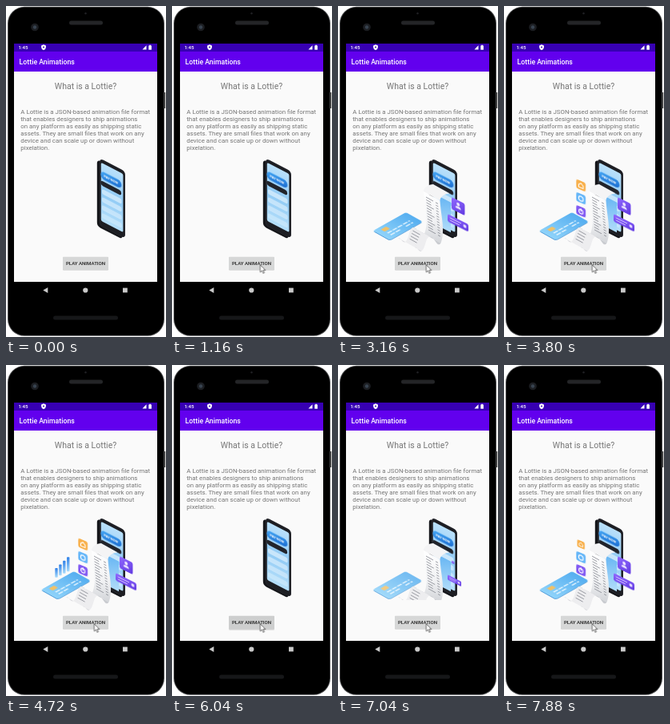
Write an HTML page that moves like this. It is 200 px wide and 414 px high and loops after 8 s.

```html
<!DOCTYPE html>
<html lang="en">
<head>
<meta charset="utf-8">
<title>Lottie Animations</title>
<style>
html, body { margin: 0; width: 100%; height: 100%; overflow: hidden; background: #fff; }
svg { display: block; width: 100%; height: 100%; font-family: Roboto, sans-serif; }
.part { transform-box: fill-box; transform-origin: 50% 50%; }
.bar { transform-origin: 50% 100%; }
.badge { transform-origin: 0 30%; }
</style>
</head>
<body>
<svg viewBox="0 0 200 414">
  <defs>
    <linearGradient id="screen" x2="0" y2="1">
      <stop stop-color="#b9e0fb"/><stop offset=".5" stop-color="#91cbf5"/><stop offset="1" stop-color="#b5dffa"/>
    </linearGradient>
    <linearGradient id="blue" x2="1" y2="1">
      <stop stop-color="#49a9f4"/><stop offset="1" stop-color="#1769cf"/>
    </linearGradient>
    <linearGradient id="barFill" x2="0" y2="1">
      <stop stop-color="#2f80e8"/><stop offset="1" stop-color="#a9dcfb"/>
    </linearGradient>
    <linearGradient id="cardFill">
      <stop stop-color="#8fd3fa"/><stop offset="1" stop-color="#55aef0"/>
    </linearGradient>
    <linearGradient id="shade" x2="0" y2="1">
      <stop stop-color="#66b5f3"/><stop offset="1" stop-color="#b3defa"/>
    </linearGradient>
    <linearGradient id="violet" x2="1" y2="1">
      <stop stop-color="#9169ff"/><stop offset="1" stop-color="#6039e0"/>
    </linearGradient>
    <linearGradient id="paper" x2="0" y2="1">
      <stop stop-color="#fff"/><stop offset=".6" stop-color="#f0f1f3"/><stop offset="1" stop-color="#d2d4d8"/>
    </linearGradient>
  </defs>

  <!-- handset -->
  <path d="M197 108h2.2v20H197z" fill="#333"/>
  <rect x="2" y=".8" width="196" height="412" rx="21" fill="#4a4b4d"/>
  <rect x="3" y="1.8" width="194" height="410" rx="20" fill="#000"/>
  <circle cx="99.5" cy="9.3" r="1.2" fill="#202124"/>
  <rect x="79" y="18.5" width="42" height="5" rx="2.5" fill="#242527"/>
  <rect x="59" y="387.5" width="81" height="5" rx="2.5" fill="#161719"/>
  <circle cx="36" cy="26.5" r="4.8" fill="#1c1e22"/>
  <circle cx="36" cy="26.5" r="2.2" fill="#384350"/>

  <!-- app -->
  <rect x="10" y="47" width="179" height="298" fill="#fafafa"/>
  <rect x="10" y="47" width="179" height="35" fill="#6200ee"/>
  <rect x="10" y="47" width="179" height="10" fill="#3700b3"/>
  <g fill="#fff">
    <text x="15.5" y="54.2" font-size="6.1" font-weight="500">1:45</text>
    <path d="M47 48.3l2.9 1.1v2.1q0 2.6-2.9 3.8q-2.9-1.2-2.9-3.8v-2.1z"/>
    <circle cx="47" cy="51.6" r="1" fill="#3700b3"/>
    <path d="M170.5 54.5h5v-5.2zM178.3 49.5h1v-.7h1.6v.7h1v5.2h-3.6z"/>
    <text x="16.6" y="73.1" font-size="8.75" font-weight="500">Lottie Animations</text>
  </g>
  <g fill="#757575">
    <text x="99.5" y="104" font-size="10.5" text-anchor="middle">What is a Lottie?</text>
    <g id="copy" font-size="7.88"></g>
  </g>
  <g fill="#c9c9c9">
    <path d="M46.3 355.5l6-3.6v7.2z"/><circle cx="99.3" cy="355.5" r="3.1"/>
    <rect x="146" y="352.6" width="5.8" height="5.8"/>
  </g>

  <!-- button -->
  <rect id="lift" x="71" y="315.5" width="57" height="16.6" rx="1.5" fill="#777" opacity="0"/>
  <rect x="71" y="314.2" width="57" height="16.4" rx="1" fill="#c4c4c4"/>
  <rect x="71" y="313.7" width="57" height="16.2" rx="1" fill="#d6d7d7"/>
  <rect id="ripple" x="71" y="313.7" width="57" height="16.2" rx="1" fill="#8d8d8d" opacity="0"/>
  <text x="99.5" y="324.1" font-size="6.1" font-weight="500" text-anchor="middle" fill="#222">PLAY ANIMATION</text>

  <!-- isometric phone -->
  <rect width="32" height="83.5" rx="4.5" transform="matrix(1 .52 0 1 113.8 191.8)" fill="#15161a"/>
  <g transform="matrix(1 .52 0 1 117 190.2)">
    <rect width="32" height="84" rx="4.5" fill="#303137"/>
    <rect x=".5" y=".6" width="31" height="83" rx="4.2" fill="#1d1e23"/>
    <rect x="1.8" y="4.6" width="27.6" height="73" rx="2" fill="url(#screen)"/>
    <g id="rows" fill="#dff1fd"></g>
    <g id="pay" class="part">
      <rect x="1.4" y="14.8" width="26" height="9.6" rx="4.6" fill="url(#blue)"/>
      <text x="14.2" y="21.1" font-size="4.1" font-weight="700" text-anchor="middle" fill="#fff">PAY NOW</text>
    </g>
    <rect x="1.2" y="27" width="26" height="5.8" rx="2.9" fill="#22242b"/>
  </g>

  <!-- card -->
  <g id="card" opacity="0">
    <g transform="matrix(.87 -.49 .87 .49 44 281)">
      <rect x="-.9" y=".9" width="47" height="24" rx="2.5" fill="#3c91d6"/>
      <rect width="47" height="24" rx="2.5" fill="url(#cardFill)"/>
      <rect x="7" y="4" width="7.5" height="5.5" rx="1" fill="#f0c168"/>
      <path d="M7 13.5h32M7 18h14M29 18h10" stroke="#f2faff" stroke-width="1.6" stroke-dasharray="6 1.5"/>
    </g>
  </g>

  <!-- receipt -->
  <g id="receipt">
    <path d="M126 238l15 7.7v37.5l-15-7.8z" fill="url(#shade)"/>
    <g id="sheets"></g>
    <g id="lines" stroke="#83868e" stroke-width=".8" fill="none"></g>
  </g>

  <!-- badges -->
  <g id="low" class="part badge">
    <g transform="matrix(1 .5 0 1 137 260)">
      <rect width="26" height="9.5" rx="2" fill="url(#violet)"/>
      <path d="M3 3.5h14M3 6.4h12" stroke="#d6c8ff" stroke-width="1"/>
      <circle cx="21.5" cy="4.8" r="2" fill="#e6dcff"/>
    </g>
  </g>
  <g id="high" class="part badge">
    <g transform="matrix(1 .5 0 1 142 239)">
      <rect width="16.5" height="15" rx="2" fill="url(#violet)"/>
      <circle cx="8.2" cy="5" r="2" fill="#efe9ff"/>
      <path d="M4.8 10.4q0-3 3.4-3t3.4 3z" fill="#efe9ff"/>
    </g>
  </g>

  <g id="icons"></g>
  <g id="bars" fill="url(#barFill)"></g>

  <path id="cursor" d="M0 0v9.2l2.2-2l1.5 3.3l1.5-.7l-1.5-3.2h2.9z" fill="#fff" stroke="#000" stroke-width=".55" opacity="0"/>
</svg>
<script>
const LOOP = 8000, RESET = 5160, REPLAY = 4160;
const $ = id => document.getElementById(id);
const fill = (id, items, draw) => { $(id).innerHTML = items.map(draw).join(''); };

fill('copy', [
  'A Lottie is a JSON-based animation file format',
  'that enables designers to ship animations',
  'on any platform as easily as shipping static',
  'assets. They are small files that work on any',
  'device and can scale up or down without',
  'pixelation.'
], (line, i) => `<text x="18.3" y="${134.8 + i * 9.12}">${line}</text>`);

fill('rows', [0, 1, 2, 3], i =>
  `<rect x="3" y="${37 + i * 10}" width="24.5" height="6.2" rx="2" opacity="${.7 - i * .08}"/>`);

// Each sheet sweeps one cubic edge of the paper across its width.
fill('sheets', [
  ['#f4f4f5', 119, 223, 113, 223, 107, 227, 107, 232],
  ['url(#paper)', 107, 232, 108, 250, 114, 270, 108, 285],
  ['#c9cbd0', 108, 285, 103, 292, 101, 277, 94, 277],
  ['#ededef', 94, 277, 89, 277, 89, 292, 84, 295],
  ['#d9dade', 84, 295, 81, 297, 79, 290, 75, 290]
], ([color, ax, ay, bx, by, cx, cy, dx, dy]) => {
  const far = (x, y) => `${x + 20.5} ${y + 11.5}`;
  return `<path fill="${color}" d="M${ax} ${ay}C${bx} ${by} ${cx} ${cy} ${dx} ${dy}
    L${far(dx, dy)}C${far(cx, cy)} ${far(bx, by)} ${far(ax, ay)}z"/>`;
});

fill('lines', [...Array(13).keys()], i => {
  const x = 110 + i * .25, y = 239 + i * 3.4;
  const onFold = i < 4 ? `M${93.5 - i * 1.3} ${281 + i * 3.4}l9 5` : '';
  return `<path d="M${x} ${y}l${i % 3 ? 6 : 9} ${i % 3 ? 3.4 : 5}M${x + 12} ${y + 6.7}l3 1.7${onFold}"/>`;
});

fill('icons', [['#f8b04b', '<path d="M3.2 8.5V5.2L6 3l2.8 2.2v3.3z"/>'],
  ['#65b6f8', '<circle cx="6" cy="6" r="2.9"/>'],
  ['#8058f2', '<circle cx="6" cy="6" r="2.6"/><path d="M6 6V2"/>']], ([color, mark], i) =>
  `<g id="icon${i}" class="part"><g transform="matrix(.98 .42 0 1 90.3 ${216.3 + i * 16.2})">
    <rect width="12" height="11.3" rx="2.3" fill="${color}"/>
    <g fill="none" stroke="#fff" stroke-width="1.1">${mark}</g></g></g>`);

fill('bars', [0, 1, 2, 3], i =>
  `<rect id="bar${i}" class="part bar" x="${61.3 + i * 4.9}" y="${254 - i * 4.6}" width="3.4" height="${11.8 + i * 2.1}" rx=".8"/>`);

function animate(id, steps) {
  $(id).animate(
    steps.map(([time, style, easing = 'linear']) => ({ ...style, easing, offset: time / LOOP })),
    { duration: LOOP, iterations: Infinity });
}

// Runs the steps, resets them, then runs them again until the loop ends.
function playTwice(id, steps) {
  const first = steps[0][1], last = steps[steps.length - 1][1];
  const again = steps.map(([t, ...rest]) => [t + REPLAY, ...rest]).filter(([t]) => t < LOOP);
  const end = again.length ? again[again.length - 1][1] : first;
  animate(id, [[0, first], ...steps, [RESET, last], [RESET, first], ...again, [LOOP, end]]);
}

const pop = (id, start, end, from, to = 'none') => playTwice(id, [
  [start, { transform: from, opacity: 0 }, 'ease-out'],
  [start + (end - start) * .3, { transform: from, opacity: 1 }, 'ease-out'],
  [end, { transform: to, opacity: 1 }]
]);

playTwice('ripple', [[1840, { opacity: 0 }], [1960, { opacity: .35 }], [2080, { opacity: .3 }], [2340, { opacity: 0 }]]);
playTwice('lift', [[1840, { opacity: 0 }], [1960, { opacity: .5 }], [2080, { opacity: .4 }], [2340, { opacity: 0 }]]);
playTwice('pay', [[2040, { transform: 'scale(1)' }, 'ease-in-out'],
  [2200, { transform: 'scale(.92)' }, 'ease-in-out'], [2350, { transform: 'scale(1)' }]]);
playTwice('card', [[2540, { opacity: 0, transform: 'translate(-2px, 0)' }],
  [2680, { opacity: .4, transform: 'translate(-2px, 0)' }],
  [2960, { opacity: 1, transform: 'translate(0, 0)' }]]);
playTwice('receipt', [[2530, { clipPath: 'inset(0 0 100% 0)' }],
  [2680, { clipPath: 'inset(0 0 42% 0)' }, 'ease-out'],
  [3140, { clipPath: 'inset(0 0 0% 0)' }]]);
pop('low', 2620, 3100, 'scale(.3)');
pop('high', 2780, 3150, 'scale(.2)');
[[3520, 3810], [3380, 3700], [3240, 3560]].forEach(([a, b], i) => pop('icon' + i, a, b, 'scale(.2)'));
for (let i = 0; i < 4; i++) playTwice('bar' + i, [
  [3960 + i * 110, { transform: 'scaleY(0)' }, 'ease-out'],
  [4360 + i * 115, { transform: 'scaleY(1)' }]
]);

const at = (x, y, opacity) => ({ transform: `translate(${x}px, ${y}px)`, opacity });
animate('cursor', [[0, at(148, 395, 0)], [520, at(148, 395, 0)], [520, at(148, 395, 1), 'ease-in-out'],
  [1160, at(110.3, 323.8, 1)], [LOOP, at(110.3, 323.8, 1)]]);
</script>
</body>
</html>
```
